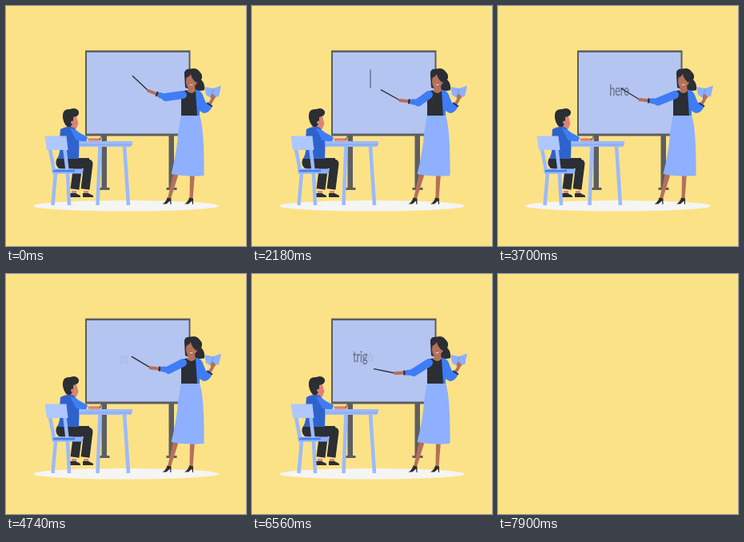
Recreate the animation shown at these times as an HTML page. Size 300 px wide and 300 px high, loop 7.92 s.

```html
<!DOCTYPE html>
<html lang="en">
<head>
<meta charset="utf-8">
<style>
html, body { margin: 0; width: 100%; height: 100%; overflow: hidden; background: #fce287; }
svg { display: block; width: 100vw; height: 100vh; }
text { font: 12.5px Lato, sans-serif; text-anchor: middle; fill: #6b7592; stroke: #6b7592; stroke-width: .2; }
path { stroke-linejoin: round; }
.ink { fill: #2b2e33; }
.blue { fill: #3f7df6; }
.pale { fill: #8eb0ff; }
.skin { fill: #b5705a; }
.line { fill: none; stroke-linecap: round; }
.wood { fill: none; stroke: #9bbafd; stroke-width: 4.5; }
.dark { stroke: #2b2e33; }
.flesh { stroke: #b5705a; }
.sleeve { stroke: #3f7df6; }
.boy { fill: #dc8377; }
</style>
</head>
<body>
<svg viewBox="0 0 300 300">
<defs>
  <path id="stand" d="M-3 160h6.500v67h3.500v3h-13v-3h3z"/>
  <path id="heel" class="ink" d="M0 0L5 1V8.500H4L3.500 4L-1 8H-6Q-1 5 0 0Z"/>
  <path id="shoe" class="ink" d="M0 0h7l6 3v2H0z"/>
</defs>
<g id="scene">
  <ellipse cx="150" cy="249.800" rx="116" ry="6.800" fill="#f5f5f4"/>

  <!-- board -->
  <g fill="#5d5e60">
    <use href="#stand" x="122.500"/>
    <use href="#stand" x="206.500"/>
    <path d="M99 55.500H230.500V162.500H99Z"/>
  </g>
  <path d="M101 58H228.500V159.500H101Z" fill="#b5c5f1"/>
  <g id="words"></g>
  <path id="shape" class="line" d="M148 80V106H178Z" pathLength="100" stroke="#6b7592" stroke-width="1.500" stroke-dasharray="100 200"/>

  <!-- pupil -->
  <path class="boy" d="M82 231h6v4h-6zM97 231h6v4h-6z"/>
  <use href="#shoe" x="80" y="234"/>
  <use href="#shoe" x="96" y="234"/>
  <path class="line dark" d="M68 198H90L86 229M90 197H103L99 229" stroke-width="11" style="stroke-linecap:butt"/>
  <path class="ink" d="M64 190H104V203H66Q60 198 64 190Z"/>
  <path class="boy" d="M76 141L88 138L90.500 147L88 153L83 158L75 155Z"/>
  <path class="ink" d="M71 140Q70 128 80 129Q88 126 91 132Q92 138 84 139V146L80 152Q73 151 71 140Z"/>
  <circle class="boy" cx="83" cy="145.500" r="1.900"/>
  <path d="M68 154Q76 149 85 152L92 162L91 191H64Q69 182 67 167Z" fill="#2f63cc"/>
  <path class="line" d="M104 167L117 167" stroke="#dc8377" stroke-width="3.500"/>
  <path class="blue" d="M80 153Q88 154 91 158L102 164L100 170L88 168Z"/>
  <path class="line dark" d="M117 167l2.500-4.500" stroke-width=".8"/>

  <!-- chair and desk -->
  <path d="M57 203.500H96V209.500H58Z" class="pale"/>
  <path d="M59 206H86" class="sleeve" stroke-width="2.500"/>
  <path class="wood" d="M55 179L60 205M73.500 179L76.500 205M62 209L58.500 249M77 209L79 249"/>
  <path class="wood" d="M117.500 174L114.500 249M148 174L153 249"/>
  <path d="M48.500 162.500H75.500L77.500 180H51Z" fill="#aec7fe"/>
  <path d="M91 169H158V173L156 176H92Z" fill="#9bbafd"/>
  <path d="M92 173.300H157" stroke="#7d9fec" stroke-width=".7"/>

  <!-- teacher -->
  <path class="skin" d="M209 209h7L206 241H202zM230 209h6L233.500 241H229.500z"/>
  <use href="#heel" x="201.500" y="239.500"/>
  <use href="#heel" x="229" y="239.500"/>
  <path class="ink" d="M223 86Q222 78 231 78.500Q238 76.500 242 82Q247 87 244 92Q249 97 248 105Q240 108 224 102Z"/>
  <path class="pale" d="M219 136H242Q248 154 247.500 212Q227 214 206.500 210Q214 180 215 159Z"/>
  <path class="ink" d="M219 107Q231 103 241 107L242 137H219Z"/>
  <path class="skin" d="M226 86Q230 82 236 87L239 96L236 100L237 106Q232 112 226 106L229 104Q225 101 225 94Z"/>
  <path class="ink" d="M224 90Q224 82 230 82Q239 80 240 90L238 96Q232 91 231 85Q229 89 224 90Z"/>
  <path d="M228.500 98Q231 99.500 234 97Q232 101 228.500 98Z" fill="#fff"/>
  <path class="pale" d="M248 101L259 103L269 99.500L266 113L256 115L250 111Z"/>
  <path d="M259 103L256.500 115" stroke="#648ee6" stroke-width=".8"/>
  <path class="line flesh" d="M253 125L258 117V112L260 114" stroke-width="4"/>
  <path class="blue" d="M237 105Q245 105 247 114L250 121L253 120L258 125Q254 134 247 134L242 131V137H239Z"/>
  <path class="dark" d="M251.500 121.500L258 125.500" stroke-width="2"/>

  <!-- pointing arm -->
  <g class="line">
    <path id="stick" class="dark" stroke-width="1.400"/>
    <path id="hand" class="flesh" stroke-width="4"/>
    <path id="upper" class="sleeve" stroke-width="10"/>
    <path id="fore" class="sleeve" stroke-width="7"/>
    <path id="cuff" class="dark" stroke-width="6" stroke-linecap="butt"/>
  </g>
</g>
</svg>
<script>
const LOOP = 7920, BLANK = 7900, FADE = 120;
const $ = id => document.getElementById(id);
const clamp = v => Math.max(0, Math.min(1, v));
const mix = (a, b, k) => a.map((v, i) => v + (b[i] - v) * k);
const line = (id, ...pts) => $(id).setAttribute("d", "M" + pts.join("L"));

function addWord(text, y, start, step, end) {
  const el = document.createElementNS("http://www.w3.org/2000/svg", "text");
  el.setAttribute("transform", `translate(162 ${y}) scale(1 1.5)`);
  const letters = [...text].map(c => {
    const span = document.createElementNS(el.namespaceURI, "tspan");
    span.textContent = c;
    return span;
  });
  el.append(...letters);
  $("words").append(el);
  return { el, letters, start, step, end };
}

const words = [
  addWord("12345", 107.5, 960, 130, 1680),
  addWord("heredity", 112, 3425, 70, 4560),
  addWord("motion", 112, 4720, 120, 5840),
  addWord("trigonometry", 110, 6020, 130, LOOP)
];

// where the hand is at a few moments; it eases between them
const rest = [178, 106], written = [190, 118];
const path = [
  [0, rest], [1340, [194, 120]], [2180, [185, 118]], [3700, [177, 117]],
  [3960, written], [4560, written], [4800, [179, 117]], [5480, written],
  [5840, written], [6560, [179, 124]], [LOOP, rest]
];

function handAt(t) {
  const i = path.findIndex(([time]) => time > t);
  const [t0, a] = path[i - 1], [t1, b] = path[i];
  return mix(a, b, (1 - Math.cos(Math.PI * (t - t0) / (t1 - t0))) / 2);
}

function drawArm(t) {
  const hand = handAt(t), [x, y] = hand;
  // the lower the hand, the flatter the stick
  const tilt = .75 - .0017 * (y - 106) ** 2;
  const reach = Math.hypot(221 - x, 122 - y);
  const elbow = mix(hand, [221, 122], 23 / reach);
  const along = k => mix(elbow, hand, k);
  line("stick", hand, [x - 27 * Math.cos(tilt), y - 27 * Math.sin(tilt)]);
  line("hand", elbow, hand);
  line("upper", [221, 111], elbow);
  line("fore", elbow, along(.3));
  line("cuff", along(.45), along(.55));
}

function drawBoard(t) {
  const shown = end => 1 - clamp((t - end) / FADE);
  for (const { el, letters, start, step, end } of words) {
    el.style.opacity = shown(end);
    letters.forEach((s, i) => s.style.opacity = s.style.fillOpacity = s.style.strokeOpacity =
      clamp((t - start - i * step) / 60));
  }
  const drawn = clamp((t - 1980) / 860);
  $("shape").style.strokeDashoffset = 100 - 100 * drawn;
  $("shape").style.opacity = drawn && shown(3160);
}

function frame(now) {
  const t = now % LOOP;
  $("scene").style.visibility = t < BLANK ? "visible" : "hidden";
  drawBoard(t);
  drawArm(t);
  requestAnimationFrame(frame);
}
requestAnimationFrame(frame);
</script>
</body>
</html>
```
